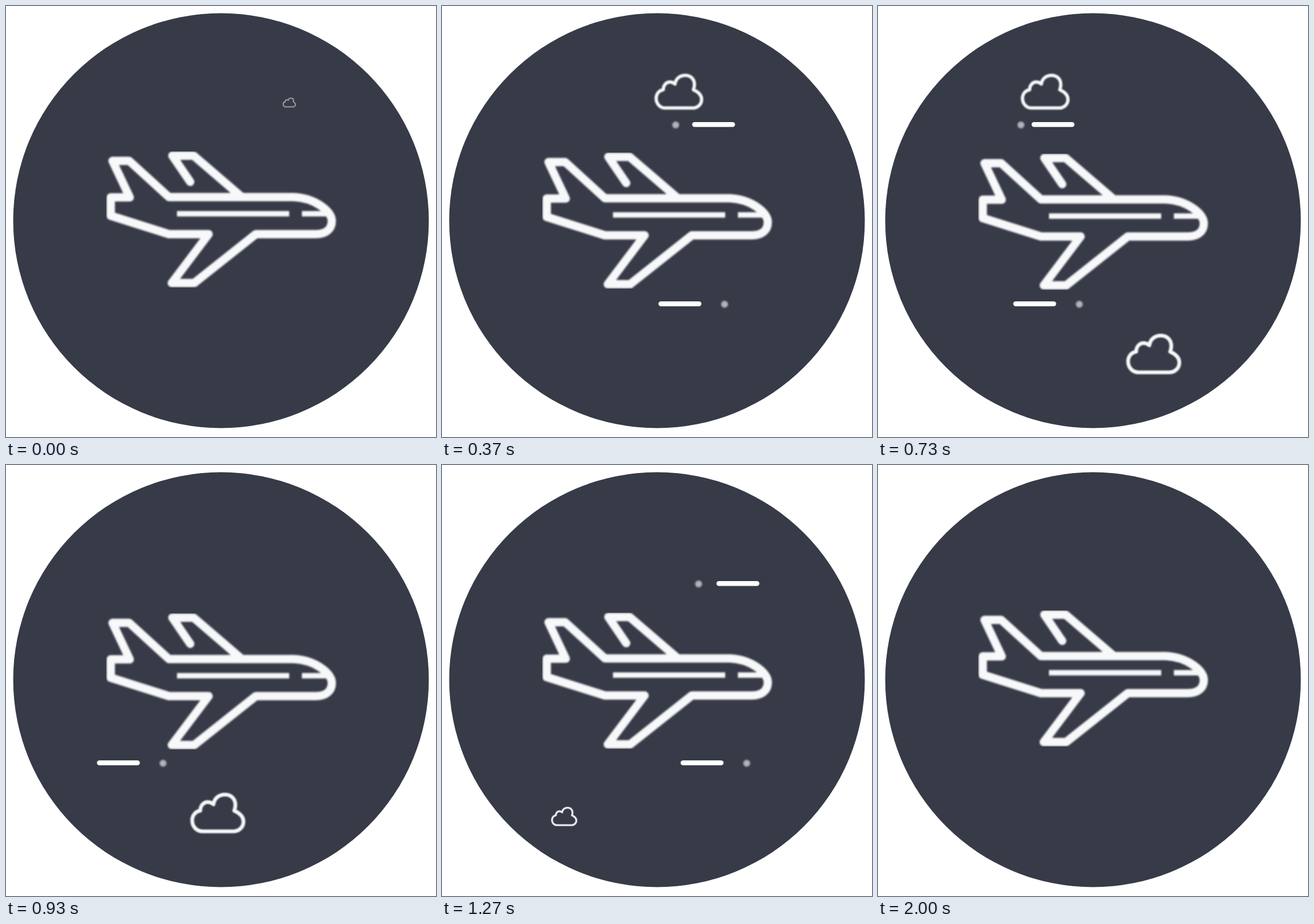
Animation of 747 by 750 pixels, one loop 2.03 s. Source, as an HTML page without scripts:

```html
<!DOCTYPE html>
<html lang="en">
<head>
<meta charset="utf-8">
<title>Flight</title>
<style>
html, body { margin: 0; width: 100%; height: 100%; overflow: hidden; background: #fff; }
svg { display: block; width: 747px; height: 750px; }

/* 61 ticks per loop; keyframe percentages are tick / 61 */
.plane, .cloud, .show, .run {
  animation: 2030ms -4ms infinite;
}
.again .show, .again .run { animation-delay: -1035.6ms; }

.line { fill: none; stroke: #f7f8f9; stroke-linejoin: round; }
.soft { filter: blur(1.5px); }
.haze { filter: blur(.9px); }
.bar { fill: #fff; }
.dot { fill: #fff; fill-opacity: .62; filter: blur(1.6px); }

.plane { animation-name: bob; animation-timing-function: steps(30); }
@keyframes bob {
  0%, 98.36%, 100% { transform: translateY(0); }
  49.18% { transform: translateY(5.5px); }
}

.high.cloud { animation-name: high; }
@keyframes high {
  0% { transform: translate(492px, 174.7px) scale(.27); opacity: .7; animation-timing-function: steps(4); }
  6.56% { transform: translate(488px, 174.7px) scale(1); opacity: 1; animation-timing-function: steps(19); }
  37.7% { transform: translate(279px, 174.7px) scale(1); opacity: 1; animation-timing-function: steps(5); }
  45.9%, 100% { transform: translate(259px, 174.7px) scale(0); opacity: .7; }
}

.low.cloud { animation-name: low; }
@keyframes low {
  0%, 18.03% { transform: translate(586px, 617px) scale(0); animation-timing-function: steps(5); }
  26.23% { transform: translate(578px, 617px) scale(1); animation-timing-function: steps(6); }
  36.07% { transform: translate(478.5px, 617px) scale(1); animation-timing-function: steps(13); }
  57.38% { transform: translate(238px, 617px) scale(1); animation-timing-function: steps(3); }
  62.3% { transform: translate(212px, 617px) scale(.474); animation-timing-function: steps(3); }
  67.21%, 100% { transform: translate(188px, 617px) scale(0); }
}

.upper .show { animation-name: upperShow; animation-timing-function: step-end; }
@keyframes upperShow {
  0%, 45.9%, 100% { opacity: 0; }
  4.92% { opacity: 1; }
}
.upper .run { --k: 1px; animation-name: upperRun; }
.upper .run.slow { --k: .94px; }
@keyframes upperRun {
  0%, 4.92% { transform: translateX(calc(157 * var(--k))); animation-timing-function: steps(5); }
  13.11% { transform: translateX(calc(105 * var(--k))); animation-timing-function: steps(3); }
  18.03% { transform: translateX(calc(62.75 * var(--k))); animation-timing-function: steps(8); }
  31.15% { transform: translateX(calc(-62.75 * var(--k))); animation-timing-function: steps(3); }
  36.07% { transform: translateX(calc(-105 * var(--k))); animation-timing-function: steps(5); }
  44.26%, 100% { transform: translateX(calc(-157 * var(--k))); }
}

.lower .show { animation-name: lowerShow; animation-timing-function: step-end; }
@keyframes lowerShow {
  0%, 49.18%, 100% { opacity: 0; }
  1.64% { opacity: 1; }
}
.lower .run { animation-name: lowerRun; animation-timing-function: steps(30); }
@keyframes lowerRun {
  0% { transform: translateX(0); }
  49.18%, 100% { transform: translateX(-384.9px); }
}
</style>
</head>
<body>
<svg viewBox="0 0 747 750">
  <defs>
    <clipPath id="crop"><rect x="174.5" y="253" width="410" height="237"/></clipPath>
    <path id="puff" d="M-26 31C-36 31-44 23-44 12C-44 2-37-4-30-5C-30-14-24-20-17-20Q-12-20-7-16C-6-26 2-33 13-33C24-33 31-25 31-15Q31-10 29-5C40 0 45 6 45 14C45 24 37 31 27 31Z"/>
    <g id="upper">
      <g class="show">
        <g class="run slow"><circle class="dot" cx="347" cy="207" r="6"/></g>
        <g class="run"><rect class="bar" x="371.8" y="202" width="74.5" height="8.4" rx="4.2"/></g>
      </g>
    </g>
    <g id="lower">
      <g class="show"><g class="run">
        <rect class="bar" x="517.2" y="514" width="74.5" height="8.4" rx="4.2"/>
        <circle class="dot" cx="632" cy="519" r="6"/>
      </g></g>
    </g>
  </defs>

  <circle cx="373.5" cy="373.5" r="361" fill="#373a47"/>

  <g class="plane"><g clip-path="url(#crop)">
    <g class="line soft" stroke-width="14.5">
      <path d="M185 269.500H214L283 332.500H500C535 334 566 356 566 374C566 388 556 397 538 397H434L327 482H288L352 397H283L182 365V333H215Z"/>
      <path d="M320 306L289 260.500H326L408 331" stroke-linecap="round"/>
      <path d="M297 361.500H492M514 361.500H556" stroke-width="9.500"/>
    </g>
  </g></g>

  <g class="high cloud">
    <g transform="translate(0 -24.700) scale(.887)"><use href="#puff" class="line haze" stroke-width="6.500"/></g>
  </g>
  <g class="low cloud">
    <g transform="translate(0 -10.500)"><use href="#puff" class="line haze" stroke-width="6.500"/></g>
  </g>

  <g class="upper"><g class="show"><g class="run slow"><circle class="dot" cx="347" cy="207" r="6"/></g><g class="run"><rect class="bar" x="371.8" y="202" width="74.5" height="8.4" rx="4.2"/></g></g></g>
  <g class="upper again"><g class="show"><g class="run slow"><circle class="dot" cx="347" cy="207" r="6"/></g><g class="run"><rect class="bar" x="371.8" y="202" width="74.5" height="8.4" rx="4.2"/></g></g></g>
  <g class="lower"><g class="show"><g class="run"><rect class="bar" x="517.2" y="514" width="74.5" height="8.4" rx="4.2"/><circle class="dot" cx="632" cy="519" r="6"/></g></g></g>
  <g class="lower again"><g class="show"><g class="run"><rect class="bar" x="517.2" y="514" width="74.5" height="8.4" rx="4.2"/><circle class="dot" cx="632" cy="519" r="6"/></g></g></g>
</svg>
</body>
</html>
```
